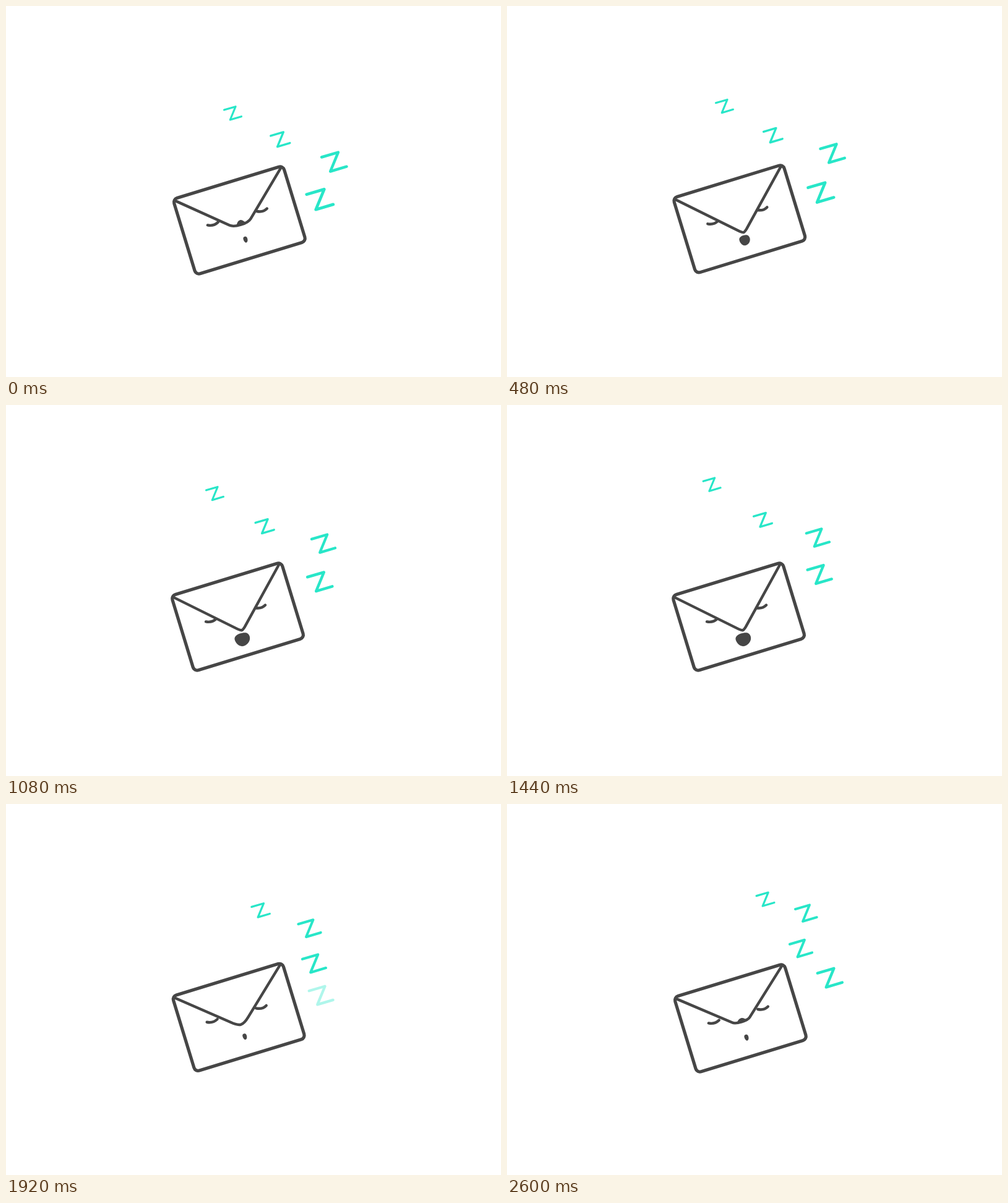
An HTML page with a canvas that plays this animation: 800x600 px, repeating every 2640 ms.

```html
<!DOCTYPE html>
<html lang="en">
<head>
<meta charset="utf-8">
<title>Sleeping envelope</title>
<style>
  html, body { margin: 0; width: 100%; height: 100%; overflow: hidden; background: #fff; }
  canvas { display: block; }
</style>
</head>
<body>
<canvas id="stage" width="800" height="600"></canvas>
<script>
const ctx = document.getElementById('stage').getContext('2d');
const LOOP = 2640, LAST = 27, INK = '#464646', MINT = '#28e6c8';
const TILT = -17 * Math.PI / 180;

const clamp = v => Math.max(0, Math.min(1, v));
const mix = (a, b, k) => a + (b - a) * k;
const ease = (from, to, n) => {
  const t = clamp((n - from) / (to - from));
  return t * t * (3 - 2 * t);
};
// Rises from 0 to 1 until `full`, then falls back between `fall` and `end`
const swell = (n, full, fall, end) => ease(0, full, n) - ease(fall, end, n);

// Each letter drifts along one cubic curve while it is alive
const letters = [
  { path: [[366.5, 173.3], [344.7, 161.8], [329.4, 134.3], [327, 110]],
    size: [.65, .65], end: 20, alpha: n => (20 - n) / 2 },
  { path: [[443.3, 215.7], [416.5, 208], [403, 174.5], [417.5, 154]], size: [.72, .67] },
  { path: [[530.3, 252], [530.8, 224.7], [481.7, 214], [483.3, 176.5]], size: [.94, .81] },
  { path: [[507.3, 312.7], [505.8, 294.5], [516.8, 266], [475, 233.5]], size: [1, .84] },
  { path: [[505.5, 312.5], [515.5, 305], [524, 293], [521.8, 281]],
    size: [.9, .93], start: 19, alpha: n => (n - 19) * .37 }
];

const zShape = new Path2D('M-21.5-8L7-16.3L-6.5 16.5L21.5 8.2');
const eyes = new Path2D('M-51.6-8Q-42.9-3.2-34-7.6M31-6.2Q40.5-1.2 48.1-5.6');
const mouth = new Path2D(
  'M-12.2-2C-12.2-7.5-7-9.8 0-9.8C8-9.8 12.5-7.5 12.5-1C12.5 6 6 11.2-1 11.2C-8 11.2-12.2 4-12.2-2Z');
const body = new Path2D();
body.roundRect(-93, -64.4, 186, 127.8, 7);

function bezier([a, b, c, d], t) {
  const u = 1 - t;
  return [0, 1].map(i =>
    u * u * u * a[i] + 3 * u * u * t * b[i] + 3 * u * t * t * c[i] + t * t * t * d[i]);
}

function drawFlap(n) {
  const point = swell(n, 5, 15, 21), drop = swell(n, 4, 16, 23.5), age = n / LAST;
  const x = mix(18 - 3.3 * age, 6, point);
  const y = mix(2.4, 18.4, point);
  const tip = mix(8.6 - 1.8 * age, 23.4, drop);
  const cx = x - (tip - y) * 1.1;
  ctx.beginPath();
  ctx.moveTo(-90.3, -61.2);
  ctx.lineTo(-x, y);
  ctx.bezierCurveTo(-cx, tip, cx, tip, x, y);
  ctx.lineTo(88, -61.4);
  ctx.fillStyle = '#fff';
  ctx.fill();
  ctx.stroke();

  // Lip bump, seen only while the flap is flat
  const bump = clamp(1 - 3 * drop);
  ctx.fillStyle = INK;
  if (bump) {
    const base = tip - 2.6, peak = mix(base, -.5, bump);
    ctx.beginPath();
    ctx.moveTo(-10, base);
    ctx.bezierCurveTo(-5, base, -5, peak, .5, peak);
    ctx.bezierCurveTo(6, peak, 6, base, 11, base);
    ctx.fill();
  }
}

function drawEnvelope(n) {
  const breath = swell(n, 9.5, 15, 24), open = swell(n, 9, 15, 20);
  ctx.save();
  ctx.translate(377.5 - 2.8 * breath, 347 - 4 * breath);
  ctx.rotate(TILT);
  ctx.strokeStyle = INK;
  ctx.lineWidth = 4.4;
  ctx.stroke(eyes);
  drawFlap(n);
  ctx.lineWidth = 5.2;
  ctx.stroke(body);
  ctx.translate(mix(.2, -3.4, open), mix(32, 36.3, open));
  ctx.scale(mix(.27, 1, open), mix(.48, 1, open));
  ctx.fill(mouth);
  ctx.restore();
}

function drawLetter({ path, size, start = 0, end = LAST, alpha = () => 1 }, n) {
  const t = clamp((n - start) / (end - start)), scale = mix(...size, t);
  ctx.save();
  ctx.globalAlpha = clamp(alpha(n));
  ctx.translate(...bezier(path, t));
  ctx.scale(scale, scale);
  ctx.strokeStyle = MINT;
  ctx.lineWidth = 4.8;
  ctx.stroke(zShape);
  ctx.restore();
}

function draw(now) {
  // Poses change every 96 ms, shown on a 40 ms clock
  const n = Math.floor(Math.floor((now % LOOP) / 40) * 5 / 12);
  ctx.fillStyle = '#fff';
  ctx.fillRect(0, 0, 800, 600);
  ctx.lineCap = ctx.lineJoin = 'round';
  drawEnvelope(n);
  letters.forEach(letter => drawLetter(letter, n));
}

const start = performance.now();
function tick() {
  draw(performance.now() - start);
  requestAnimationFrame(tick);
}
tick();
</script>
</body>
</html>
```
